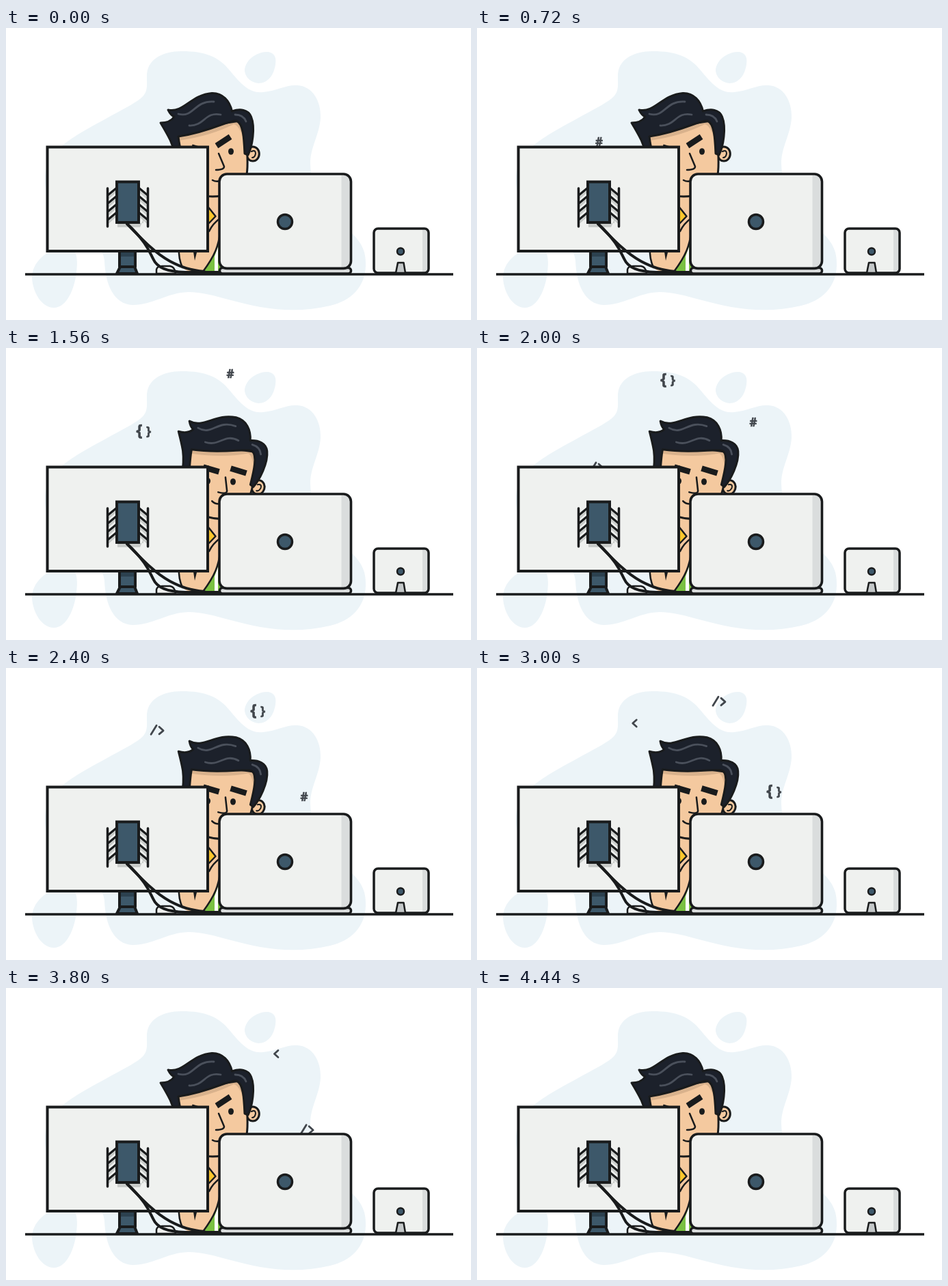
An HTML page with a canvas for the animation above (4.68 s loop, 680 by 428 pixels).

```html
<!DOCTYPE html>
<html lang="en">
<head>
<meta charset="utf-8">
<title>Developer at work</title>
<style>
html, body { margin: 0; width: 100%; height: 100%; overflow: hidden; background: #fff; }
canvas { display: block; width: 680px; height: 428px; }
</style>
</head>
<body>
<canvas id="stage"></canvas>
<script>
const W = 680, H = 428, LOOP = 4680, STEP = 40;
const INK = '#191b1c', STEEL = '#3d586a', SHELL = '#eff1ef', SHADE = '#dadddd';
const SKIN = '#f4c99f', SKIN_DARK = '#d9b28c', HAIR = '#1c212b', SKY = '#ecf4f8', GLYPH = '#41464c';

const canvas = document.getElementById('stage');
const dpr = window.devicePixelRatio || 1;
canvas.width = W * dpr;
canvas.height = H * dpr;
const ctx = canvas.getContext('2d');
ctx.lineCap = ctx.lineJoin = 'round';

const lerp = (a, b, k) => a + (b - a) * k;
const ease = (t, from, to) => {
  const k = Math.min(1, Math.max(0, (t - from) / (to - from)));
  return k * k * (3 - 2 * k);
};

function shape(path, fill, width, color = INK) {
  const p = typeof path === 'string' ? new Path2D(path) : path;
  if (fill) { ctx.fillStyle = fill; ctx.fill(p); }
  if (width) { ctx.lineWidth = width; ctx.strokeStyle = color; ctx.stroke(p); }
}
const line = (path, width, color) => shape(path, null, width, color);

function oval(x, y, rx, ry, fill, width) {
  const p = new Path2D();
  p.ellipse(x, y, rx, ry, 0, 0, Math.PI * 2);
  shape(p, fill, width);
}

function box(x, y, w, h, r, fill, width) {
  const p = new Path2D();
  p.roundRect(x, y, w, h, r);
  shape(p, fill, width);
}

// Rounded panel with a darker strip along its right edge
function panel(x, y, w, h, r, strip, width) {
  box(x, y, w, h, r, SHELL);
  box(x + w - strip, y, strip, h, [0, r, r, 0], SHADE);
  box(x, y, w, h, r, null, width);
}

function backdrop() {
  ctx.fillStyle = '#fff';
  ctx.fillRect(0, 0, W, H);
  shape('M206 72C205 46 229 34 257 34C291 34 311 42 327 62C345 84 357 96 376 94C397 92 409 83 426 84' +
    'C448 85 461 107 460 132C458 158 445 174 445 199C446 247 478 272 502 297C520 314 527 327 526 349' +
    'C525 379 505 400 474 407C440 415 407 415 372 409C332 402 297 387 267 387C235 388 215 406 185 406' +
    'C158 405 145 376 144 341C142 300 58 290 57 224C56 190 80 171 112 152C150 130 183 114 196 104' +
    'C208 95 206 85 206 72Z', SKY);
  shape('M349 63C349 47 367 35 381 35C392 35 396 43 394 53C392 69 383 81 369 81C358 80 350 72 349 63Z', SKY);
  shape('M38 366C38 344 58 326 82 321C103 318 106 335 103 358C100 384 88 410 70 410C52 410 39 387 38 366Z', SKY);
}

// Shared flight path of the code symbols: time, x, y
const flight = [
  [500, 160, 215], [737, 180, 163], [927, 201, 122], [1100, 224, 88], [1300, 264, 54],
  [1490, 308, 40], [1580, 333, 39], [1700, 357, 52], [2042, 409, 117], [2400, 436, 189], [2640, 446, 246]
];

function slope(i, axis) {
  const a = flight[Math.max(0, i - 1)], b = flight[Math.min(flight.length - 1, i + 1)];
  return (b[axis] - a[axis]) / (b[0] - a[0]);
}

function flightAt(t) {
  const last = flight.length - 1;
  if (t < flight[0][0] || t > flight[last][0]) return null;
  let i = 0;
  while (i < last - 1 && t > flight[i + 1][0]) i++;
  const a = flight[i], b = flight[i + 1], d = b[0] - a[0], k = (t - a[0]) / d;
  const k2 = k * k, k3 = k2 * k;
  return [1, 2].map(n =>
    a[n] * (2 * k3 - 3 * k2 + 1) + b[n] * (3 * k2 - 2 * k3) +
    slope(i, n) * d * (k3 - 2 * k2 + k) + slope(i + 1, n) * d * (k3 - k2));
}

function letter(ch, size, x, y) {
  ctx.font = `bold ${size}px "Noto Sans", "Open Sans", sans-serif`;
  ctx.textAlign = 'center';
  ctx.textBaseline = 'alphabetic';
  ctx.fillStyle = ctx.strokeStyle = GLYPH;
  ctx.lineWidth = 0.6;
  ctx.fillText(ch, x, y);
  ctx.strokeText(ch, x, y);
}

const symbols = [
  [0, () => letter('#', 17, 0, 6)],
  [633, () => { letter('{', 23, -6, 6.5); letter('}', 18, 7.5, 5.5); }],
  [1318, () => line('M-9 6L-1-7M3-5L9 .5L3 5.5', 2.8, GLYPH)],
  [1862, () => line('M2.5-5L-3 0L2.5 5', 2.8, GLYPH)]
];

function drawSymbols(t) {
  for (const [delay, draw] of symbols) {
    const pos = flightAt(t - delay);
    if (!pos) continue;
    ctx.save();
    ctx.translate(...pos);
    draw();
    ctx.restore();
  }
}

function body() {
  shape('M288 236L322 236L322 330L285 357Q262 360 257 349Q252 337 253 322Z', SKIN);
  shape('M293 259L306.5 276L293 290Z', '#fcc72c', 2.5);
  shape('M314 300C311 318 306 333 288 357L314 358Z', '#7ac143');
  shape('M305 335L310 320L310 358L305 358Z', '#fff');
  line('M313 279Q302 287 297 298', 2.5);
  line('M313 300C311 318 306 333 288 357', 2.5);
  line('M253 322Q252 338 258 351', 2.5);
  shape('M274 328L276 341L279 329Z', INK);
}

const FACE = 'M250 150C252 190 258 225 273 240Q286 247 302 247Q330 247 347 230Q354 220 353 190L349 135Z';
const HAIR_SHAPE = 'M260 200L249 200Q247 180 240 164Q235 154 226 139C235 139 242 136 246 130C241 128 239 124 237 120' +
  'C260 125 270 98 301 95.5C317 95 327 107 330.5 122C342 118 354 119 358.5 130C365 146 360 174 354 186L349 184' +
  'C348 162 347 140 337 136C327 134 300 152 252 159Q253 170 260 200Z';

function brow(x, y, deg) {
  ctx.save();
  ctx.translate(x, y);
  ctx.rotate(deg * Math.PI / 180);
  ctx.fillStyle = INK;
  ctx.fillRect(-12, -4.3, 24, 8.6);
  ctx.restore();
}

function head(k) {
  ctx.save();
  ctx.translate(297, 221);
  ctx.rotate(16.5 * k * Math.PI / 180);
  ctx.translate(-297, -221);
  oval(361, 184.5, 9.3, 10.5, SKIN, 3);
  line('M359 181Q365 178 365 184Q364 190 360 190', 2);
  shape(FACE, SKIN);
  ctx.save();
  ctx.clip(new Path2D(FACE));
  shape('M250 155Q295 148 332 133Q346 137 348 166Q342 143 333 141Q300 158 253 165Z', SKIN_DARK);
  ctx.restore();
  line(FACE, 3);
  shape(HAIR_SHAPE, HAIR, 3);
  line('M252 126C275 132 275 106 304 108M268 143C290 144 291 122 314 127M335 127Q347 127 351 137', 2.8, '#4a505b');
  line('M311 184L319 203Q319 208 307 208M302 223Q307 226 313 224', 2.5);
  ctx.restore();

  brow(lerp(318, 340, k), lerp(166, 180, k), lerp(-33, 17, k));
  brow(lerp(283, 300, k), 178, 16);
  oval(lerp(329, 332, k), lerp(181, 196, k), 4, 4.8, INK);
  oval(lerp(285, 295, k), lerp(186, 195, k), 4, 4.8, INK);
}

function monitor() {
  shape('M166 327H189V350H166Z', STEEL);
  shape('M166 327H189V335H166Z', '#2c414f');
  line('M166 327H189V350H166Z', 4);
  shape('M167 350H188L192 360H162Z', STEEL, 4);
  ctx.lineJoin = 'miter';
  shape('M60.5 174.5H295V327H60.5Z', SHELL, 4);
  ctx.lineJoin = 'round';

  shape('M163 286H201V280L196 292H163Z', '#c8cbc9');
  for (let i = 0; i < 4; i++) {
    const y = 235 + i * 12;
    line(`M150 ${y + 14}L160 ${y + 5}M196 ${y + 5}L206 ${y + 14}`, 3, '#c8cbc9');
    line(`M149 ${y + 10}L161 ${y}M195 ${y}L207 ${y + 10}`, 3.2);
  }
  line('M148.5 235V291M207.5 235V291', 3.5);
  ctx.lineJoin = 'miter';
  shape('M162 225.5H194V285H162Z', STEEL, 4);
  ctx.lineJoin = 'round';
}

function desk() {
  shape('M220 360V354Q221 349 228 349H240Q247 350 248 360Z', SHELL, 2.5);
  line('M177 287C206 314 210 329 215 338C221 352 236 357 262 358L314 358', 4);
  line('M177 287C200 311 218 330 240 342C257 351 270 355 290 357', 4);
  box(312.5, 351.5, 192, 8.5, 4, SHADE, 3.5);
  panel(312, 214, 192.5, 138.4, 11, 14, 3.6);
  oval(408, 284, 10.5, 10.5, STEEL, 3.5);
  panel(538, 294, 80, 65, 6, 9, 3.5);
  oval(577, 327.5, 5, 5, STEEL, 2.5);
  shape('M573 344H581.5L584 359H570Z', '#c4c8c9', 2.5);
  ctx.lineCap = 'butt';
  line('M28 361H654', 3.5);
  ctx.lineCap = 'round';
}

function render(t) {
  const turn = ease(t, 970, 1440) - ease(t, 2980, 3450);
  ctx.setTransform(dpr, 0, 0, dpr, 0, 0);
  backdrop();
  drawSymbols(t);
  body();
  head(turn);
  monitor();
  desk();
}

const start = performance.now();
function tick() {
  const t = (performance.now() - start) % LOOP;
  render(Math.floor(t / STEP) * STEP);
  requestAnimationFrame(tick);
}
tick();
</script>
</body>
</html>
```
